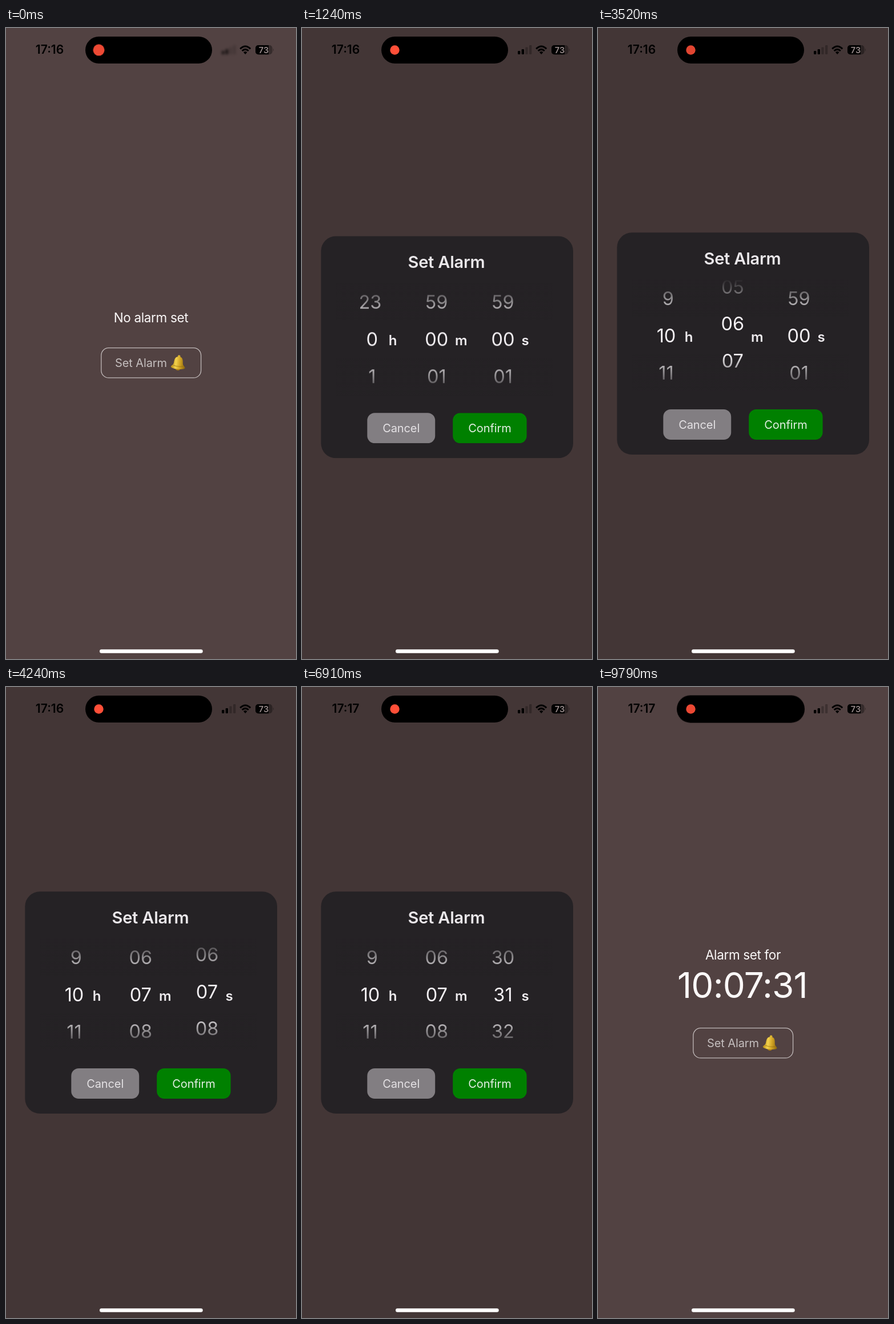
Animation, 508 px wide and 1102 px high, one loop 9820 ms. Source, as an HTML page:

```html
<!DOCTYPE html>
<html lang="en">
<head>
<meta charset="utf-8">
<title>Alarm picker</title>
<style>
  html, body { margin: 0; width: 100%; height: 100%; overflow: hidden; background: #524242; }
  #stage { display: block; width: 100%; height: 100%; }
  text { font-family: Inter, Roboto, sans-serif; text-anchor: middle; }

  .loop, #picker g { animation: 9820ms linear infinite; }
  .step { animation-timing-function: step-end; }

  .label { font-size: 22.5px; letter-spacing: -.35px; fill: #fbf8f8; }
  .time { font-size: 62px; letter-spacing: -.8px; fill: #fbf8f8; }
  .button { font-size: 20px; letter-spacing: -.1px; }
  .clock { font-size: 21px; font-weight: 600; }
  .title { font-size: 29px; font-weight: 600; letter-spacing: -.2px; fill: #eae7ea; }
  .unit { font-size: 24px; font-weight: 600; fill: #eeebee; }
  #picker text { font-size: 32.5px; fill: #f3f0f3; }

  /* Main screen */
  .before { animation-name: before; }
  .after { animation-name: after; }
  .shift { animation-name: shift; }
  .press { animation-name: press; }
  @keyframes before { 0% { opacity: 1 } 74.85%, 100% { opacity: 0 } }
  @keyframes after { 0% { opacity: 0 } 74.85%, 100% { opacity: 1 } }
  @keyframes shift { 0% { transform: none } 74.85%, 100% { transform: translateY(37px) } }
  @keyframes press { 0%, 8.15%, 12.2%, 100% { opacity: 1 } 9.67% { opacity: .25 } }

  /* Dialog: quadratic ease in and out, split at the midpoint */
  .dim { animation-name: dim; }
  .dialog { animation-name: slide; }
  .confirm { animation-name: confirm; }
  @keyframes dim {
    0% { opacity: 0 }
    9.745%, 74.85% { animation-timing-function: cubic-bezier(.333, 0, .667, .333) }
    9.745% { opacity: 0 }
    11.273%, 76.375% { opacity: .095; animation-timing-function: cubic-bezier(.333, .667, .667, 1) }
    12.8%, 74.85% { opacity: .19 }
    77.9%, 100% { opacity: 0 }
  }
  @keyframes slide {
    0% { transform: translateY(1102px) }
    9.745%, 74.85% { animation-timing-function: cubic-bezier(.333, 0, .667, .333) }
    9.745% { transform: translateY(1102px) }
    11.273%, 76.375% { transform: translateY(551px); animation-timing-function: cubic-bezier(.333, .667, .667, 1) }
    12.8%, 74.85% { transform: translateY(0) }
    77.9%, 100% { transform: translateY(1102px) }
  }
  @keyframes confirm { 0%, 73.3%, 77.4%, 100% { opacity: 1 } 74.8% { opacity: .25 } }

  /* Wheels: one row is 64.7px */
  #picker .hours { animation-name: hours; }
  #picker .minutes { animation-name: minutes; }
  #picker .seconds { animation-name: seconds; }
  @keyframes hours {
    0% { transform: translateY(0) }
    15.27% { transform: translateY(0); animation-timing-function: cubic-bezier(.2, .4, .35, 1) }
    27.49% { transform: translateY(-645px) }
    29.02%, 100% { transform: translateY(-647px) }
  }
  @keyframes minutes {
    0% { transform: translateY(0) }
    30.04% { transform: translateY(0); animation-timing-function: cubic-bezier(.2, .4, .35, 1) }
    39.71%, 100% { transform: translateY(-452.9px) }
  }
  @keyframes seconds {
    0% { transform: translateY(0) }
    39.41% { transform: translateY(0); animation-timing-function: cubic-bezier(.3, .3, .5, 1) }
    43.18% { transform: translateY(-456.9px); animation-timing-function: cubic-bezier(.3, .3, .5, .915) }
    52.14% { transform: translateY(-1919px); animation-timing-function: cubic-bezier(.15, .46, .4, 1) }
    60.6%, 100% { transform: translateY(-2005.7px) }
  }

  /* Status bar */
  .minute16 { animation-name: minute16; }
  .minute17 { animation-name: minute17; }
  .signal { animation-name: signal; }
  .island { animation-name: island; transform-origin: 250px 38px; }
  .size { animation-name: size; transform-origin: 162.5px 38.5px; }
  .pulse { animation-name: pulse; }
  @keyframes minute16 { 0% { opacity: 1 } 56.01%, 100% { opacity: 0 } }
  @keyframes minute17 { 0% { opacity: 0 } 56.01%, 100% { opacity: 1 } }
  @keyframes signal { 0% { filter: blur(2px); opacity: .75 } 5%, 100% { filter: blur(0); opacity: 1 } }
  @keyframes island { 0%, 95.5% { transform: none } 99%, 100% { transform: scale(1.009, 1.02) } }
  @keyframes size { 0% { transform: scale(1.22) } 4%, 100% { transform: none } }
  @keyframes pulse {
    0%, 100% { opacity: .93 }
    3.4%, 9.2%, 18.7%, 24.5%, 34%, 39.8%, 49.2%, 55%, 64.5%, 70.3%, 79.8%, 85.6%, 95.1% { opacity: 1 }
    6.3%, 21.6%, 36.9%, 52.1%, 67.4%, 82.7% { opacity: .82 }
    98% { opacity: .88 }
  }
</style>
</head>
<body>
<svg id="stage" viewBox="0 0 508 1102" preserveAspectRatio="none">
  <defs>
    <linearGradient id="gold">
      <stop offset="0" stop-color="#b08416"/>
      <stop offset=".32" stop-color="#f3d24c"/>
      <stop offset=".62" stop-color="#cfa224"/>
      <stop offset="1" stop-color="#8b650c"/>
    </linearGradient>
    <linearGradient id="fade" x2="0" y2="1">
      <stop offset="0" stop-color="#252225"/>
      <stop offset=".333" stop-color="#252225" stop-opacity="0"/>
      <stop offset=".667" stop-color="#252225" stop-opacity="0"/>
      <stop offset="1" stop-color="#252225"/>
    </linearGradient>
  </defs>

  <rect width="508" height="1102" fill="#524242"/>

  <text class="label loop step before" x="254" y="513.5">No alarm set</text>
  <g class="loop step after">
    <text class="label" x="254" y="476">Alarm set for</text>
    <text class="time" x="253" y="542.5">10:07:31</text>
  </g>

  <g class="loop step shift">
    <g class="loop press">
      <rect x="166.8" y="558.7" width="174.8" height="52.2" rx="13" fill="none" stroke="#c0b9b9" stroke-width="1.3"/>
      <text class="button" x="236.5" y="592.3" fill="#c5bfbf">Set Alarm</text>
      <g transform="translate(302 584.5) rotate(6)">
        <ellipse cy="10.5" rx="4" ry="3" fill="#a97c12"/>
        <circle cy="-11" r="2.4" fill="#d9b232"/>
        <path fill="url(#gold)" d="M-3-10C-7-9-7.5-4-8 1C-8.5 5-12.5 6-12.5 8C-12.5 10-6 11.3 0 11.3S12.5 10 12.5 8C12.5 6 8.5 5 8 1C7.5-4 7-9 3-10Z"/>
        <path fill="none" stroke="#8b650c" stroke-opacity=".6" d="M-9 5Q0 8.5 9 5"/>
      </g>
    </g>
  </g>

  <rect class="loop dim" width="508" height="1102"/>

  <g class="loop dialog">
    <rect x="33.3" y="357.3" width="441.7" height="387.7" rx="26" fill="#252225"/>
    <text class="title" x="253" y="412.5">Set Alarm</text>
    <svg id="picker" x="33" y="440" width="442" height="194"></svg>
    <rect x="60" y="439" width="380" height="196" fill="url(#fade)"/>
    <text class="unit" x="159" y="548">h</text>
    <text class="unit" x="278.7" y="548">m</text>
    <text class="unit" x="391" y="548">s</text>
    <rect x="114.3" y="666" width="118.9" height="53" rx="13" fill="#827e82"/>
    <text class="button" x="173.7" y="699.8" fill="#e4e1e4">Cancel</text>
    <g class="loop confirm">
      <rect x="264.2" y="666" width="129.4" height="53" rx="13" fill="#008000"/>
      <text class="button" x="329" y="699.8" fill="#e4eee4">Confirm</text>
    </g>
  </g>

  <text class="clock loop step minute16" x="76.5" y="45.3">17:16</text>
  <text class="clock loop step minute17" x="76.5" y="45.3">17:17</text>

  <rect class="loop island" x="139" y="15" width="222" height="47" rx="23.5"/>
  <g class="loop size">
    <circle class="loop pulse" cx="162.5" cy="38.5" r="8.2" fill="#ff4f38"/>
  </g>

  <g class="loop signal">
    <rect x="378" y="40" width="4.3" height="6" rx="1.2"/>
    <rect x="384.7" y="37" width="4.3" height="9" rx="1.2"/>
    <rect x="391.3" y="33.5" width="4.3" height="12.5" rx="1.2" opacity=".25"/>
    <rect x="398" y="30" width="4.3" height="16" rx="1.2" opacity=".25"/>
  </g>

  <g fill="none" stroke="#000" stroke-width="3">
    <path d="M410.2 36.4Q419.2 27.6 428.2 36.4"/>
    <path d="M413.6 40Q419.2 34.8 424.8 40"/>
  </g>
  <path d="M416 42.5Q419.2 39.7 422.4 42.5L419.2 46Z"/>

  <rect x="437" y="30" width="29.5" height="16.3" rx="5" opacity=".35"/>
  <path d="M460 30H442A5 5 0 0 0 437 35V41.3A5 5 0 0 0 442 46.3H460Z"/>
  <path d="M467.7 35.5Q470 38.2 467.7 41Z" opacity=".35"/>
  <text x="451.5" y="43.5" font-size="14.5" font-weight="600" fill="#988b8b">73</text>

  <rect x="164" y="1085.3" width="180.7" height="6.5" rx="3.2" fill="#fff"/>
</svg>
<script>
  const picker = document.getElementById('picker');
  const ROW = 64.7;

  function make(tag, attrs, parent) {
    const el = document.createElementNS('http://www.w3.org/2000/svg', tag);
    for (const key in attrs) el.setAttribute(key, attrs[key]);
    return parent.appendChild(el);
  }

  function wheel(name, x, count, last, pad) {
    const column = make('g', { class: name }, picker);
    for (let i = -2; i <= last; i++) {
      const value = String((i + count) % count);
      const nudge = !pad && value.length < 2 ? 3.3 : 0;
      const text = make('text', { x: x + nudge, y: 108.8 + i * ROW }, column);
      text.textContent = pad ? value.padStart(2, '0') : value;
    }
  }

  wheel('hours', 86.5, 24, 12, false);
  wheel('minutes', 202.8, 60, 9, true);
  wheel('seconds', 319, 60, 33, true);
</script>
</body>
</html>
```
